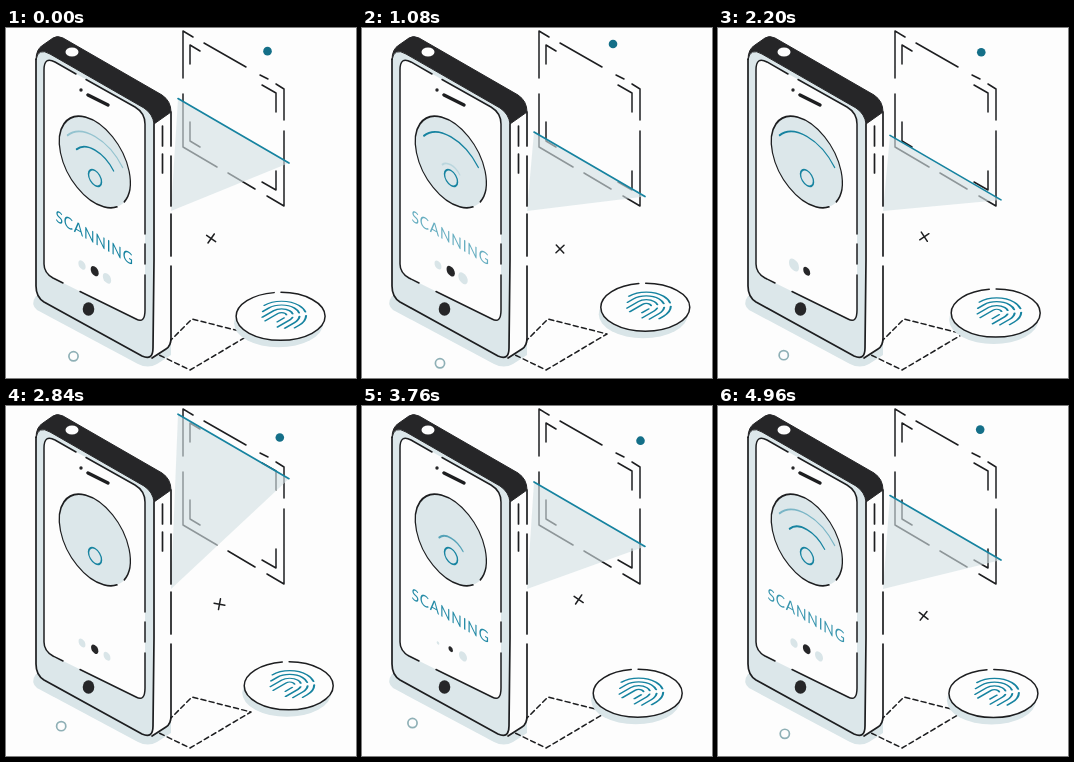
Animation, 350 px wide and 350 px high, one loop 5000 ms. Source, as an HTML page:

```html
<!DOCTYPE html>
<html lang="en">
<head>
<meta charset="utf-8">
<title>Scanning</title>
<style>
  html, body { margin: 0; width: 100%; height: 100%; overflow: hidden; background: #fdfdfd; }
  svg { display: block; width: 100vw; height: 100vh; }
  .ink { fill: none; stroke: #1d1e20; stroke-width: 1.7; stroke-linecap: round; stroke-linejoin: round; }
  .thin { stroke-width: 1.5; }
  .teal { fill: none; stroke: #1683a0; stroke-width: 1.7; stroke-linecap: round; }
  .pale { fill: #dce7ea; }
  .dark { fill: #262628; }
  .white { fill: #fdfdfd; }
  text { font: 400 16px Lato, sans-serif; letter-spacing: .9px; fill: #1683a0; }
</style>
</head>
<body>
<svg viewBox="0 0 350 350">
  <!-- framed target -->
  <g class="ink thin">
    <path d="M177 50V3L187 9M198 15L240 39M254 47L262 51M270 56L278 61V92M278 103V178L261 168M249 161L222 145M211 139L177 119V66"/>
    <path d="M184 36V17L194 23M256 57L270 65V84M184 94V113L194 119M256 154L270 162V143"/>
  </g>
  <polygon id="beam" fill="#d3e1e4" opacity=".62"/>
  <path id="line" class="teal"/>

  <!-- floor -->
  <path fill="#d9e5e8" d="M30 268Q24 276 31 282L132 336Q142 341 151 336L165 327V312L60 262Z"/>
  <path class="ink thin" stroke-dasharray="5 3.4" d="M151 326L186 291L245 306L184 342Z"/>

  <!-- phone -->
  <path class="white" d="M147 96L165 84V310Q165 318 160 321L145 331Z"/>
  <path class="ink" d="M165 84V118M165 128V178M165 186V228M165 238V310Q165 318 160 321L146 330"/>
  <path class="ink" d="M156.500 98V118M156.500 126V145"/>
  <path class="pale" d="M30 34Q30 18 44 26L138 80Q148 86 148 98L147 320Q147 333 136 328L38 274Q30 269 30 258Z"/>
  <path class="dark" stroke="#262628" stroke-linejoin="round" d="M30 32Q30 21 37 17L47 10Q51 7 57 10L156 67Q165 73 165 84L148 96Q147 86 138 80L44 26Q32 19 30 32Z"/>
  <path class="ink" d="M148 96V232L147 320Q147 333 136 328L38 274Q30 269 30 258V31"/>
  <ellipse class="white" cx="66" cy="24" rx="6.500" ry="4.500"/>
  <path class="white" d="M38 42Q38 28 49 34L129 79Q139 85 139 96V282Q139 296 130 291L47 250Q38 245 38 236Z"/>
  <path class="ink thin" d="M57 255L47 250Q38 245 38 236V42Q38 28 49 34L70 46M80 51.500L129 79Q139 85 139 96V206M139 216V236M139 247V282Q139 296 130 291L74 263.500"/>
  <circle class="dark" cx="75" cy="62" r="1.700"/>
  <path class="ink" style="stroke-width:3.4" d="M82 67L102 77"/>
  <ellipse class="dark" cx="82.500" cy="281" rx="5.800" ry="6.800"/>

  <!-- screen content -->
  <g transform="matrix(.866 .5 0 1 88.800 134)">
    <circle class="pale" r="41"/>
    <circle class="ink thin" r="41" stroke-dasharray="228 12 30 0" transform="rotate(75)"/>
  </g>
  <g id="waves" transform="matrix(.866 .5 0 1 89 150)">
    <circle class="teal" r="7.500"/>
  </g>
  <text id="label" transform="matrix(.866 .5 0 1 49.500 193)">SCANNING</text>
  <g id="dots"></g>

  <!-- fingerprint disc -->
  <g id="disc">
    <ellipse fill="#d9e5e8" cx="-2" cy="7" rx="44.500" ry="24"/>
    <ellipse class="white" rx="44.500" ry="24"/>
    <ellipse class="ink thin" rx="44.500" ry="24" stroke-dasharray="158 7 70 0"/>
    <g id="print" class="teal" transform="matrix(.866 .5 -.866 .5 1 -1)"></g>
  </g>

  <!-- drifting marks -->
  <path id="cross" class="ink thin" d="M-5.500 0H5.500M0 -5.500V5.500"/>
  <circle id="spot" r="4.300" fill="#146f88"/>
  <circle id="ring" r="4.600" fill="none" stroke="#8fb0b6" stroke-width="1.700"/>
</svg>
<script>
const LOOP = 5000;
const $ = id => document.getElementById(id);
const clamp = v => Math.max(0, Math.min(1, v));
const put = (el, x, y, rest = '') => el.setAttribute('transform', `translate(${x} ${y}) ${rest}`);

function add(parent, tag, attrs) {
  const el = document.createElementNS('http://www.w3.org/2000/svg', tag);
  for (const k in attrs) el.setAttribute(k, attrs[k]);
  return $(parent).appendChild(el);
}

// Eased 0 -> 1 -> 0, lowest at `start`.
function swing(t, start, period) {
  const p = ((t - start) / period % 1 + 1) % 1 * 2;
  const u = p > 1 ? 2 - p : p;
  return u < .5 ? 2 * u * u : 1 - 2 * (1 - u) ** 2;
}

// Smooth interpolation through evenly eased stops.
function track(t, times, values) {
  let i = 0;
  while (i < times.length - 2 && t >= times[i + 1]) i++;
  const u = clamp((t - times[i]) / (times[i + 1] - times[i]));
  return values[i] + (values[i + 1] - values[i]) * u * u * (3 - 2 * u);
}

// Arches of the print: radius, left leg, right leg.
[[4, 15, 9], [9.3, 13, 14], [14.7, 7, 11], [20, 0, 5]].forEach(([r, a, b]) =>
  add('print', 'path', {
    d: `M${-r} ${a}V0A${r} ${r} 0 0 1 ${r} 0V${b}`,
    'stroke-dasharray': `${r * 2.1 + a} 5 80`
  }));

const waves = [10, 1040, 3310, 4220].map(born => ({
  born, el: add('waves', 'path', { class: 'teal' })
}));

const beats = [0, 1080, 2200, 2840, 3760, 4320, 4960, 5000];
const dots = [
  [76, 237, '#d9e5e8', [4.2, 4, 5.8, 4, 1.5, 4.4, 4.2, 4.2]],
  [88.7, 243.2, '#262628', [4.6, 4.8, 4, 4.2, 2.6, 4.8, 4.4, 4.6]],
  [101, 250.3, '#d9e5e8', [4.8, 5.4, 0, 4, 4.6, 5, 4.6, 4.8]]
].map(([x, y, fill, size]) => ({
  size, el: add('dots', 'circle', { fill, transform: `matrix(.866 .5 0 1 ${x} ${y})` })
}));

function drawWave({ born, el }, t) {
  const age = (t - born + LOOP) % LOOP;
  const r = 13 + 28.5 * Math.min(1, age / 1080) ** 2;
  const x = r * .766, y = -r * .643;
  el.setAttribute('d', `M${-x} ${y}A${r} ${r} 0 0 1 ${x} ${y}`);
  el.setAttribute('opacity', clamp(.12 + age / 800) * clamp((1800 - age) / 300));
}

function draw(t) {
  const y = 108.5 - 101 * swing(t, 988, 1260);
  $('line').setAttribute('d', `M172 ${y}L283 ${y + 64.5}`);
  $('beam').setAttribute('points', `172,${y} 283,${y + 64.5} 165,183`);

  const p = swing(t, 150, 1680);
  put($('disc'), 274 + 9.5 * p, 289 - 10 * p);

  const c = Math.cos((t - 1050) / LOOP * 2 * Math.PI);
  put($('cross'), 207.5 - 9.5 * c, 207 + 14 * c, `rotate(${35 - t / LOOP * 360})`);
  put($('spot'), 265 - 14 * c, 25.5 - 9.5 * c);
  put($('ring'), 64 + 14 * c, 326 + 9.3 * c);

  waves.forEach(w => drawWave(w, t));
  dots.forEach(d => d.el.setAttribute('r', track(t, beats, d.size)));
  $('label').setAttribute('opacity', track(t,
    [0, 1080, 1600, 3300, 3650, 4320, 4960, 5000],
    [1, .65, 0, 0, .95, .7, .85, 1]));
}

const begin = performance.now();
function tick() {
  draw((performance.now() - begin) % LOOP);
  requestAnimationFrame(tick);
}
tick();
</script>
</body>
</html>
```
